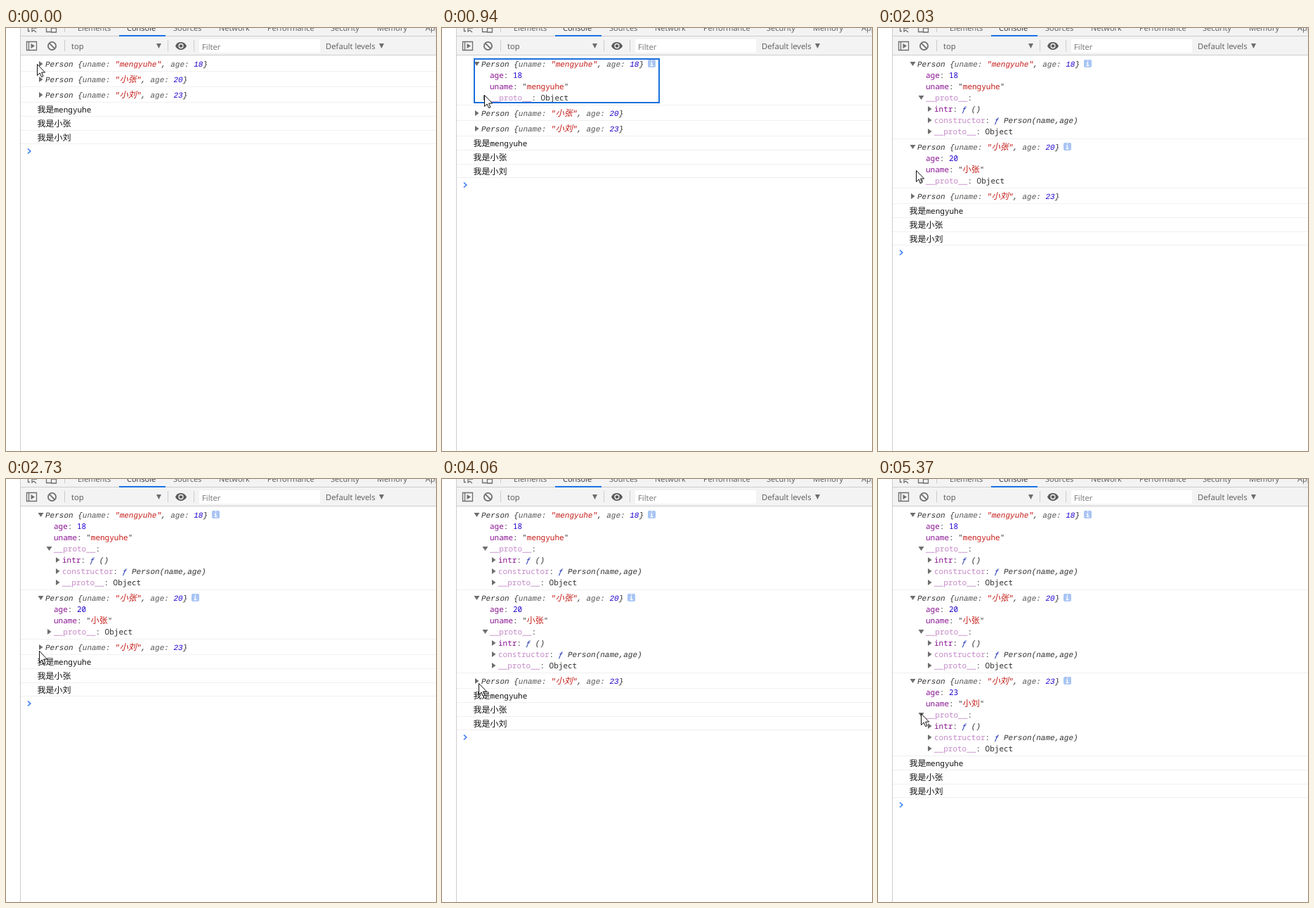
Animation of 612 by 601 pixels, one loop 5550 ms. Source, as an HTML page:

```html
<!DOCTYPE html>
<html lang="zh-CN">
<head>
<meta charset="utf-8">
<title>Console</title>
<style>
html, body { margin: 0; width: 100%; height: 100%; overflow: hidden; background: #fff; }
svg { display: block; }
text { white-space: pre; text-rendering: geometricPrecision; }
.ui { font: 11.3px "Open Sans", "Noto Sans", sans-serif; fill: #5a5a5a; }
.tab { font-size: 11px; }
.mono { font: 11px "Noto Sans Mono", "DejaVu Sans Mono", monospace; fill: #303030; }
.it { font-family: "Liberation Mono", monospace; font-style: italic; }
.han { font: 12px "Noto Sans CJK SC", "Noto Sans CJK", sans-serif; }
.it .han { font-style: italic; }
.say { fill: #111; }
.key { fill: #881391; }
.dim { fill: #c58ac9; }
.gray { fill: #565656; }
.str { fill: #c41a16; }
.num { fill: #1c00cf; }
.fn { fill: #0d22aa; }
</style>
</head>
<body>
<svg width="612" height="601" viewBox="0 0 612 601">
  <rect x="20" width="592" height="38" fill="#f3f3f3"/>
  <path d="M20 11.5H612M20 38.5H612M20.5 0V601M83.5 0V6M83.5 17V33M230.5 17V33M267.5 17V33" stroke="#ccc"/>
  <rect x="161" y="10" width="66" height="2" fill="#1a73e8"/>
  <rect x="275" y="16" width="172" height="19" fill="#fff"/>
  <g fill="none" stroke="#6e6e6e" stroke-width="1.3">
    <path d="M31.5 0V4.5H34M37 0V5L39.5 3L43 6M38 0H44M57.5 0V5.5H64M64.5 0H71.5V6H64.5Z"/>
    <path d="M29.5 19.5H43.5V31.5H29.5ZM32.5 20V31"/>
    <circle cx="65.5" cy="25.5" r="5.6" stroke-width="1.8"/>
    <path d="M61.6 21.6L69.4 29.4" stroke-width="1.8"/>
  </g>
  <path d="M35.5 22L41 25.5L35.5 29ZM214 22H221L217.5 29ZM531 22H538L534.5 29Z" fill="#6e6e6e"/>
  <path d="M241 25.5C244 18.2 254 18.2 257 25.5C254 32.8 244 32.8 241 25.5Z" fill="#5a5a5a"/>
  <circle cx="249" cy="25.5" r="3" fill="#5a5a5a" stroke="#f3f3f3" stroke-width="1.3"/>
  <g id="tabs" class="ui"></g>
  <g class="ui">
    <text x="93" y="30">top</text>
    <text x="279" y="31" fill="#757575">Filter</text>
    <text x="455" y="30">Default levels</text>
  </g>
  <g id="log"></g>
  <circle id="halo" r="12" fill="#ff0" opacity=".65"/>
  <path id="cursor" d="M.5 .5V16.5L4.2 13L6.6 18.6L9 17.6L6.6 12.1H11.6Z" fill="#fff" stroke="#111"/>
</svg>
<script>
const LOOP = 5550, TICK = 77;
const $ = id => document.getElementById(id);

// open: time the object unfolds, proto: time its __proto__ unfolds
const people = [
  { name: 'mengyuhe', age: 18, open: 160, proto: 1170 },
  { name: '小张', age: 20, open: 1800, proto: 3430 },
  { name: '小刘', age: 23, open: 4430, proto: 5300 }
];
const FOCUS_END = 1800;

// first jump, last jump, x, y
const moves = [
  [90, 90, 46, 48], [470, 470, 61, 74], [550, 940, 60, 95],
  [1250, 1340, 54, 138], [1400, 1570, 54, 171], [2030, 2030, 54, 202],
  [2100, 2180, 54, 220], [2650, 2730, 47, 244], [2900, 3200, 60, 215],
  [3520, 3890, 55, 278], [3970, 4060, 52, 290], [4760, 4900, 68, 337],
  [5070, 5070, 61, 333]
];
const clicks = [[90, 240], [1100, 1250], [1720, 1800], [2350, 2500],
  [3370, 3520], [4290, 4430], [5220, 5370]];

const span = (cls, s) => `<tspan class="${cls}">${s}</tspan>`;
const text = (x, mid, s, cls = '') => `<text class="mono ${cls}" x="${x}" y="${mid + 4}">` +
  s.replace(/[\u4e00-\u9fff]+/g, han => span('han', han)) + '</text>';
const rule = y => `<rect x="21" y="${y}" width="591" height="1" fill="#f0f0f0"/>`;
const arrow = (x, mid, open) => `<path fill="#6e6e6e" d="M${x} ` +
  (open ? `${mid - 3}h8l-4 6z` : `${mid - 4}v8l5.5 -4z`) + '"/>';
const info = (x, mid) => `<rect x="${x}" y="${mid - 6}" width="11" height="11" rx="2" fill="#a8c5f4"/>` +
  `<path d="M${x + 4} ${mid - 1.5}h1.5v4M${x + 3.5} ${mid + 2.5}h4M${x + 4.8} ${mid - 4.5}h1.5" fill="none" stroke="#fff" stroke-width="1.3"/>`;

function drawLog(t) {
  let out = '', mid = 51;
  people.forEach((p, i) => {
    const open = t >= p.open, proto = t >= p.proto, top = mid;
    const wide = p.name.length < 3 ? 24 : p.name.length * 6.6;
    out += arrow(open ? 45.5 : 47, mid, open) + text(56, mid,
      'Person {' + span('gray', 'uname: ') + span('str', `"${p.name}"`) + ', ' +
      span('gray', 'age: ') + span('num', p.age) + '}', 'it');
    if (open) {
      out += info(Math.round(56 + 27 * 6.6 + wide + 6), mid);
      out += text(68, mid += 16, span('key', 'age') + ': ' + span('num', p.age));
      out += text(68, mid += 16, span('key', 'uname') + ': "' + span('str', p.name) + '"');
      out += arrow(proto ? 57.5 : 59, mid += 16, proto) +
        text(68, mid, span('dim', '__proto__') + (proto ? ':' : ': Object'));
    }
    if (proto) {
      const func = s => span('it', span('fn', 'ƒ') + ' ' + s);
      [span('key', 'intr') + ': ' + func('()'),
       span('dim', 'constructor') + ': ' + func('Person(name,age)'),
       span('dim', '__proto__') + ': Object'
      ].forEach(s => out += arrow(71, mid += 16, false) + text(80, mid, s));
    }
    if (i === 0 && open && t < FOCUS_END)
      out += `<rect x="46" y="44" width="263" height="${mid - top + 14}" fill="none" stroke="#1a6fdc" stroke-width="2"/>`;
    out += rule(mid + 10);
    mid += 22;
  });
  const base = mid - 12;
  people.forEach((p, i) => {
    out += text(44.5, base + 11 + 20 * i, '我是' + p.name, 'say') + rule(base + [20, 40, 59][i]);
  });
  out += `<path d="M31 ${base + 66.5}l3.8 3.5l-3.8 3.5" fill="none" stroke="#367cf1" stroke-width="1.6"/>`;
  $('log').innerHTML = out;
}

function cursorAt(t) {
  let x = 44, y = 51;
  for (const [start, end, tx, ty] of moves) {
    if (t < start) break;
    const gaps = Math.round((end - start) / TICK);
    const done = t >= end ? 1
      : (Math.floor((t - start) / (end - start) * gaps + 1e-6) + 1) / (gaps + 1);
    x += (tx - x) * done;
    y += (ty - y) * done;
  }
  return [Math.round(x), Math.round(y)];
}

const tabs = { Elements: 102, Console: 172, Sources: 238, Network: 303,
  Performance: 372, Security: 462, Memory: 528, Application: 597 };
$('tabs').innerHTML = Object.entries(tabs).map(([name, x]) =>
  `<text class="tab" x="${x}" y="4"${name === 'Console' ? ' fill="#333"' : ''}>${name}</text>`).join('');

const changes = [...people.flatMap(p => [p.open, p.proto]), FOCUS_END];
let shown = -1;
function frame() {
  const t = performance.now() % LOOP;
  const state = changes.filter(c => t >= c).length;
  if (state !== shown) {
    drawLog(t);
    shown = state;
  }
  const at = `translate(${cursorAt(t)})`;
  $('cursor').setAttribute('transform', at);
  $('halo').setAttribute('transform', at);
  $('halo').style.display = clicks.some(([on, off]) => t >= on && t < off) ? '' : 'none';
  requestAnimationFrame(frame);
}
frame();
</script>
</body>
</html>
```
